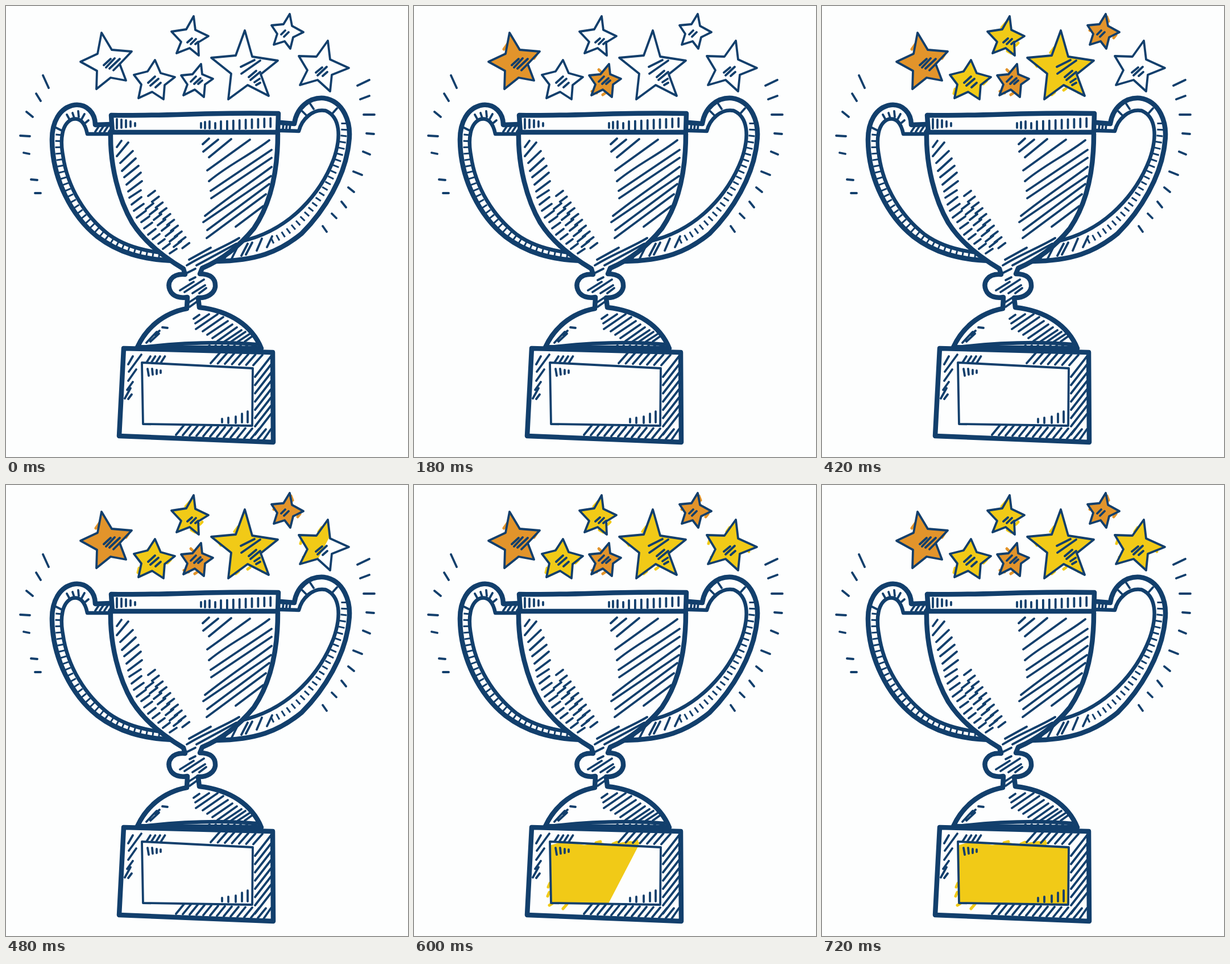
An HTML page that plays this animation: 707x793 px, repeating every 750 ms.

```html
<!DOCTYPE html>
<html>
<head>
<meta charset="utf-8">
<style>
  html, body { margin: 0; width: 100%; height: 100%; overflow: hidden; background: #fdfefe; }
  svg { display: block; width: 707px; height: 793px; }
  #ink { fill: none; stroke: #123f6c; stroke-width: 3.8; stroke-linecap: round; stroke-linejoin: round; }
  .bold { stroke-width: 8.5; }
  .mid { stroke-width: 6.5; }
  .ticks { stroke-linecap: butt; stroke-width: 11; stroke-dasharray: 3 8; }
  .paper { fill: #fdfefe; }
</style>
</head>
<body>
<svg viewBox="0 0 707 793">
  <g id="paint"></g>
  <g id="ink">
    <!-- handles -->
    <path class="bold" d="M184 208L157 209C157 188 142 172 121 174C94 178 80 205 81 238C82 304 115 369 160 405C198 434 240 446 296 448"/>
    <path class="mid" d="M184 225L143 225C139 205 130 196 117 199C98 206 95 235 100 262C108 320 140 370 181 402C210 423 246 431 276 434"/>
    <path class="ticks" d="M93 225C89 260 97 303 116 339C134 373 166 405 198 421C224 433 252 439 280 441"/>
    <path d="M107 191l5 9M117 188l3 9M127 185l1 10M138 190l-5 9M145 201l-6 5M86 213l12 6"/>
    <path class="bold" d="M483 205L507 207C511 179 533 160 559 162C594 167 608 205 603 240C597 300 560 360 520 400C480 433 440 448 368 449"/>
    <path class="mid" d="M483 219L515 220C520 199 540 180 562 184C588 195 590 230 576 270C555 325 503 394 413 414"/>
    <path class="ticks" d="M595 205C596 250 579 293 553 334C531 368 503 397 465 414"/>
    <path d="M521 185l8 8M535 172l6 9M582 180l-8 9M383 446l12-19M397 444l12-24M414 439l11-21M422 437l11-21M441 430l9-21M459 424l9-19"/>
    <!-- bowl, stem and dome -->
    <path class="bold paper" d="M184 225C183 280 198 340 222 381C243 414 278 442 312 462L315 472C291 470 283 486 288 499C293 512 308 514 319 512L318 532C276 540 246 567 231 600L449 602C433 563 395 536 340 530L338 513C353 514 366 506 368 494C369 479 360 471 341 471L345 461C378 447 409 424 436 391C466 347 478 291 478 225"/>
    <path class="bold paper" d="M185 192C280 194 370 186 479 189L478 222L187 222Z"/>
    <path class="mid" d="M231 601C290 594 362 588 440 595"/>
    <!-- pedestal -->
    <path class="bold paper" d="M207 602L469 609L470 767L199 756Z"/>
    <path id="plate" d="M239 627L434 637L433 738L241 735Z"/>
    <!-- rays -->
    <path d="M65 122l10 22M53 154l8 13M36 186l11 9M25 228l17 1M31 258l10 2M44 305l11 1M51 329l10 0M618 140l21-10M623 164l16-6M629 191l19 0M634 224l13 1M628 256l12 5M611 291l15 6M602 319l10 8M590 344l8 10M573 365l8 8M557 387l7 10"/>
    <!-- hand-placed shading -->
    <path d="M195 199v16M203 200v14M211 201v12M219 203v9M227 206v5M343 206v8M350 204v11M358 203v12M368 206v9"/>
    <path d="M346 243l11-10M347 256l26-21M357 266l39-32M354 289l75-54M357 308C390 280 428 263 463 236M360 325L467 253M361 338L467 267M350 369C390 337 428 312 467 283M347 380L466 299M354 394L463 313M353 408L457 331M404 388l48-36M318 456C350 436 380 426 410 408M335 456l70-38M322 446l38-21"/>
    <path d="M195 248l8-11M195 264l20-24M201 276l22-21M204 290l24-22M208 301l25-20M212 314l25-21M215 326l24-18M217 337l20-13M221 349l17-13M225 360l17-12M230 372l16-12M238 380l14-10M243 391l14-10M250 402l13-10M258 410l12-9M268 418l11-8M276 427l12-9M288 435l12-8"/>
    <path d="M317 470l16-8M323 482l10-5M306 500l24-15M314 503l34-22M328 505l22-14M340 505l12-9M322 521l14-9M323 529l14-10"/>
    <path d="M330 550l10-7M333 558l24-16M334 568l38-26M346 572l36-25M354 578l36-24M363 584l35-24M372 589l34-24M384 590l30-20M396 590l25-17M408 590l20-13M420 590l14-10M247 592l18-19M254 590l15-14M262 578l8-7M275 565l9 1"/>
    <path d="M215 630l8-14M216 643l22-30M215 659l14-20M213 675l10-14M209 690l10-18M215 691l6-8M249 638l2 12M257 638l1 10M265 640v7M272 641v4M380 726v6M391 724v9M404 722v11M415 717v15M425 713v19M452 764l14-20"/>
    <path id="hatching"/>
    <!-- star shading -->
    <path d="M172 104l12-11M176 108l15-16M182 110l18-17M189 113l12-12M250 135l12-11M254 140l14-12M263 143l9-8M325 133l9-9M331 137l11-10M338 137l7-6M319 64l8-7M325 67l9-9M333 67l5-4M413 107l24-12M414 119l33-23M427 125l13-11M430 130l17-14M437 134l9-6M440 139l7-4M484 50l7-7M489 54l8-8M545 117l11-9M548 122l16-15M557 123l8-7"/>
    <g id="outlines"></g>
  </g>
</svg>
<script>
const LOOP = 750, STEP = 30, SLANT = 0.52;
const ORANGE = '#e2942b', YELLOW = '#f1ca17';
const $ = id => document.getElementById(id);

// x, y of the first stroke, offset between strokes, count, stroke vector
const hatch = (x, y, dx, dy, n, lx, ly) =>
  Array.from({ length: n }, (_, i) => `M${x + dx * i} ${y + dy * i}l${lx} ${ly}`).join('');

$('hatching').setAttribute('d',
  hatch(378, 203, 10.9, -0.7, 9, 0, 15) +
  hatch(250, 334, 6.7, 10.2, 10, 12, -9) +
  hatch(246, 357, 7, 9.5, 8, 13, -10) +
  hatch(350, 604, 11, 0, 9, 8, -7) +
  hatch(247, 627, 8.5, 0, 4, 7, -11) +
  hatch(360, 628, 12.5, 0.6, 7, 16, -18) +
  hatch(438, 652, 0, 14.5, 8, 28, -36) +
  hatch(299, 754, 12, 0.6, 13, 14, -17) +
  hatch(157, 221, 8, 0, 4, 6, -9) +
  hatch(487, 216, 6, 0, 3, 1, -9));

// colour, start and end of the colouring, outline, scribbles past the outline
const stars = [
  [ORANGE, 10, 100, '168,47 186,77 221,80 200,102 211,131 184,126 159,146 160,114 131,98 161,84', 'M158 76l7-10M177 70l3 8M211 92l4-6'],
  [ORANGE, 100, 170, '343,102 345,120 364,128 350,138 348,160 332,147 312,157 319,138 308,122 328,120', 'M313 150l8 3M325 112l8 8M338 152l-6 4'],
  [ORANGE, 185, 240, '499,14 503,35 523,46 505,55 500,75 490,62 471,68 477,49 467,34 488,32', 'M501 19l3 8M513 56l4-5M475 41l-4 2'],
  [YELLOW, 240, 320, '262,95 272,118 297,125 279,139 277,164 257,151 233,162 238,138 225,121 249,115', 'M231 125l4 6M234 146l-2 8M255 108l-5 6M284 137l5-5'],
  [YELLOW, 325, 365, '330,18 333,42 356,53 338,64 339,87 323,74 300,83 308,63 291,45 317,41', 'M316 38l8-9M326 79l7 4M341 69l4-4'],
  [YELLOW, 360, 420, '420,43 433,89 478,96 448,120 462,158 425,139 391,164 396,119 361,91 404,87', 'M374 100l4 6M404 156l5-4M425 148l4-3M445 146l6 6M402 82l6-8'],
  [YELLOW, 425, 525, '566,61 570,94 603,109 573,121 570,150 548,130 517,139 530,113 515,88 546,89', 'M521 94l-3 9M523 127l2 7M583 111l6 6M550 82l5-7']
];
const plate = [YELLOW, 540, 637,
  '238,634 262,627 300,633 325,628 345,632 380,626 397,628 394,635 434,637 433,738 272,735 241,735',
  'M239 700l-3 7M238 716l-3 7M238 739l5-3M262 745l7-8M320 629l8-2M350 631l7-3M382 631l10-5'];

const fills = [...stars, plate].map(([color, start, end, points, scribble], i) => {
  const edges = points.split(' ').map(p => p.split(',')).map(([x, y]) => +x + SLANT * y);
  $('paint').insertAdjacentHTML('beforeend',
    `<clipPath id="wipe${i}"><path/></clipPath>
     <g clip-path="url(#wipe${i})" fill="${color}" stroke="${color}" stroke-linecap="round">
       <polygon points="${points}" stroke="none"/><path d="${scribble}" stroke-width="5"/></g>`);
  return { start, end, from: Math.min(...edges) - 12, to: Math.max(...edges) + 12 };
});
fills.forEach((fill, i) => fill.wipe = $('wipe' + i).firstChild);

// The plate is shaded above its colour, so the paint layer sits inside the drawing.
$('outlines').innerHTML = stars.map(s => `<polygon points="${s[3]}"/>`).join('');
const plateGroup = $('paint').lastElementChild;
$('ink').insertBefore(plateGroup, $('plate'));

function draw() {
  const time = Math.floor(performance.now() % LOOP / STEP) * STEP;
  for (const { start, end, from, to, wipe } of fills) {
    const p = Math.min(1, Math.max(0, (time - start) / (end - start)));
    const x = from + (to - from) * p;
    wipe.setAttribute('d', p ? `M-600 0H${x}L${x - SLANT * 793} 793H-600Z` : '');
  }
  requestAnimationFrame(draw);
}
draw();
</script>
</body>
</html>
```
